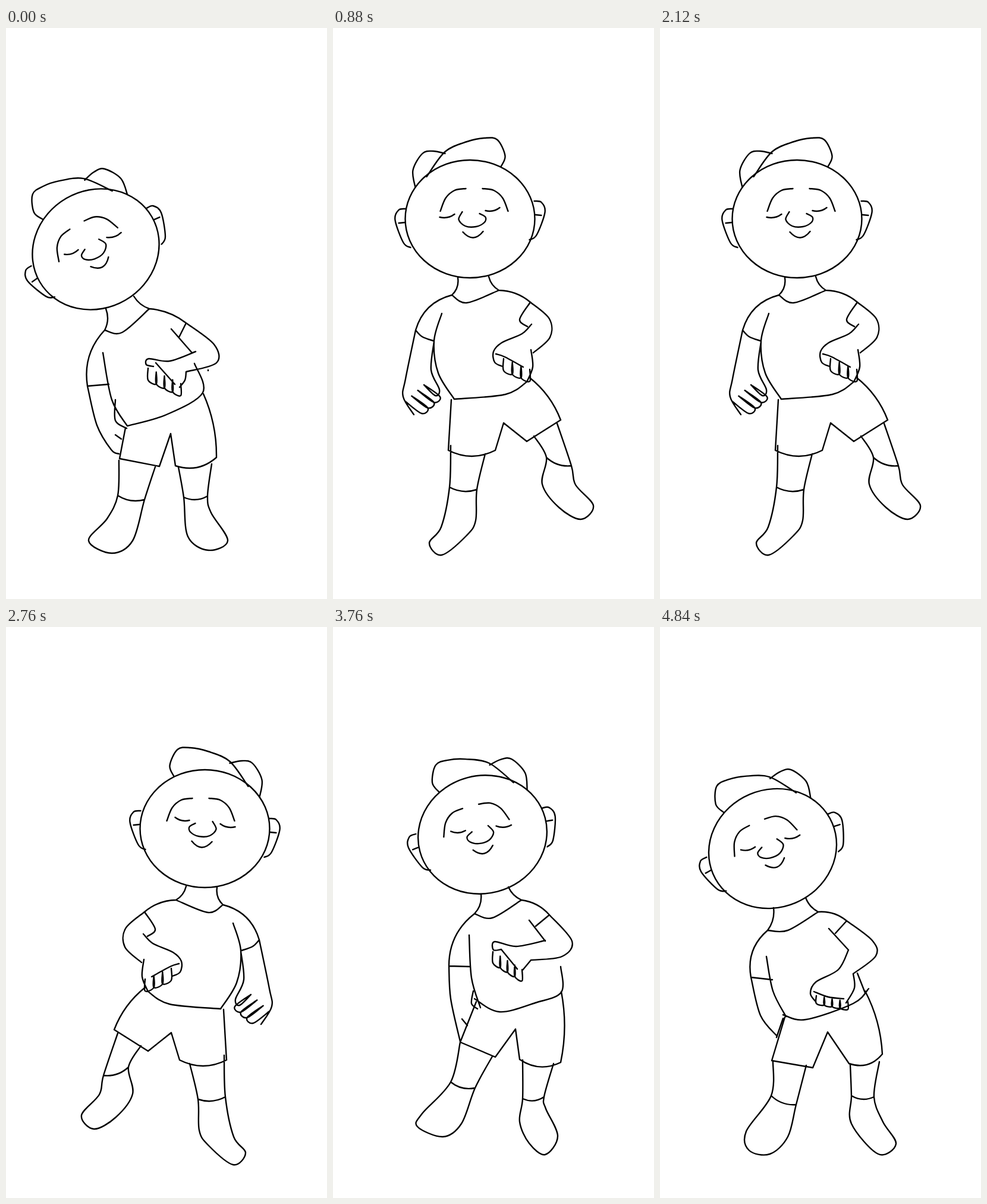
These frames come from a looping animation (540 by 960 pixels, 4920 ms). An HTML page:

```html
<!DOCTYPE html>
<html lang="en">
<head>
<meta charset="utf-8">
<title>Dancing boy</title>
<style>
  html, body { margin: 0; width: 100%; height: 100%; overflow: hidden; background: #fff; }
  svg { display: block; width: 100%; height: 100%; }
  svg * { fill: none; stroke: #000; stroke-width: 2.4; stroke-linecap: round; stroke-linejoin: round; }
</style>
</head>
<body>
<svg id="stage" viewBox="0 0 540 960"></svg>
<script>
const stage = document.getElementById("stage");

function add(parent, tag, attrs) {
  const el = document.createElementNS("http://www.w3.org/2000/svg", tag);
  for (const k in attrs) el.setAttribute(k, attrs[k]);
  return parent.appendChild(el);
}

const pts = text => text.split(" ").map(p => p.split(",").map(Number));
const plus = (a, b, s = 1) => [a[0] + b[0] * s, a[1] + b[1] * s];
const mix = (a, b, u) => [a[0] + (b[0] - a[0]) * u, a[1] + (b[1] - a[1]) * u];

// Smooth curve through points (Catmull-Rom)
function curve(p) {
  if (typeof p === "string") p = pts(p);
  const at = i => p[Math.max(0, Math.min(p.length - 1, i))];
  const slope = i => mix(at(i - 1), at(i + 1), 0.5).map((v, k) => (v - at(i - 1)[k]) / 3);
  let d = "M" + p[0];
  for (let i = 1; i < p.length; i++) {
    d += `C${plus(p[i - 1], slope(i - 1))} ${plus(p[i], slope(i), -1)} ${p[i]}`;
  }
  return d;
}

// Bow from a to b; a positive sag bends it to the right-hand side of the way
function arc(a, b, sag = 0) {
  const dx = b[0] - a[0], dy = b[1] - a[1], s = 2 * sag / Math.hypot(dx, dy);
  return `M${a}Q${plus(mix(a, b, 0.5), [-dy, dx], s)} ${b}`;
}

// n U-shaped fingers on the knuckle line a-b
function fingers([a, b, reach], n) {
  let d = "";
  for (let i = 0; i < n; i++) {
    const p = mix(a, b, i / n), q = mix(a, b, (i + 1) / n);
    d += curve([p, plus(p, reach), plus(q, reach), q]);
  }
  return d;
}

// Outline from hip round the foot and back; the hem joins the second and last but one points
function leg(text) {
  const p = pts(text);
  return curve(p) + arc(p[1], p[p.length - 2], 5);
}

// One head for all poses, around its own centre
function head(parent, [x, y, tilt, side = 1]) {
  const g = add(parent, "g", { transform: `translate(${x} ${y}) rotate(${tilt}) scale(${side} 1)` });
  add(g, "ellipse", { rx: 109, ry: 99 });
  let d = curve("73,-71 42,-113 5,-130 -24,-136 -46,-133 -59,-106 -52,-88") +
    curve("92,-53 96,-82 80,-110 62,-114 42,-110") +
    curve("13,-12 19,1 8,12 -10,13 -24,6 -26,-3 -16,-9") +
    arc([-22, 21], [12, 22], 10) + arc([26, -8], [51, -3], 3) + arc([-50, -19], [-26, -14], 3);
  for (const s of [1, -1]) {
    const ear = p => curve(pts(p).map(([px, py]) => [s * px, py + (s - 1) * 6.5]));
    const brow = pts("14,-51 33,-48 48,-35 57,-13").map(([px, py]) => [s * px - 7, py]);
    d += ear("108,-17 120,-15 126,2 112,40 100,48") + ear("110,6 120,7") + curve(brow);
  }
  add(g, "path", { d });
}

function body(p) {
  const [jawL, collarL, , collarR, jawR] = pts(p.neck);
  const [waistL, outL, inL, crotch, inR, outR, waistR] = pts(p.shorts);
  const [sagL, sagR] = p.cuffs || [0, 10];
  return [
    arc(jawL, collarL, -4), curve(pts(p.neck).slice(1, 4)), arc(jawR, collarR, 3),
    arc(collarL, pts(p.hemL)[0], 12), arc(collarR, pts(p.hemR)[0], -5),
    ...[p.hemL, p.hemR, p.side, p.shirt, ...p.arms].map(curve),
    fingers(pts(p.fist), p.count || 4), p.open ? fingers(pts(p.open), 3) : "",
    arc(waistL, outL), arc(outL, inL, -sagL), arc(inL, crotch), arc(crotch, inR),
    arc(inR, outR, sagR), arc(waistR, outR, -6), leg(p.legA)
  ].join("");
}

// Key points of the four poses; the last point of fist and open is the finger length
const step = {
  head: [230.5, 321, 0, -1],
  neck: "210,420 200,449 225,462 279,441 262,418",
  hemL: "139,508 150,519 169,526", hemR: "332,461 314,490 327,502",
  side: "183,480 170,526 177,580 204,624", shirt: "204,624 290,616 326,595",
  arms: ["332,461 364,489 365,520 337,546", "334,498 318,514 284,529 270,544 272,562 285,569",
    "274,548 289,553 320,570", "333,541 336,570 326,595",
    "139,508 122,590 118,620 136,650", "170,527 165,575 179,608 172,618 153,600"],
  fist: "287,556 331,574 0,20", count: 3, open: "122,628 153,600 27,20",
  shorts: "199,625 194,710 273,710 287,664 326,695 383,659 331,588", cuffs: [-10, 0],
  legA: "198,702 196,772 182,839 162,866 183,886 225,853 240,828 242,776 256,716",
  legB: "338,686 359,722 352,767 380,806 417,826 438,803 408,768 401,736 377,665"
};
const glide = {
  head: [251.5, 349, -15],
  neck: "249,449 238,482 268,489 317,459 295,437",
  hemL: "195,570 231,571", hemR: "364,484 341,503",
  side: "229,518 233,590 248,640", shirt: "238,625 280,647 340,632 384,614 383,571",
  arms: ["364,484 402,528 385,554 333,560", "357,527 308,537 272,529 270,543 283,542",
    "283,542 310,575", "333,560 318,578", "330,493 357,528",
    "195,570 198,625 214,697", "236,612 233,633 243,642", "217,659 226,670"],
  fist: "269,546 318,576 0,19",
  shorts: "241,630 214,698 273,723 307,676 314,727 383,732 384,613",
  legA: "214,698 198,765 150,818 142,840 185,857 216,835 239,775 268,722",
  legB: "319,728 319,793 314,832 330,868 357,887 378,856 358,810 355,790 371,734"
};
const lean = {
  head: [189.5, 372.5, -23],
  neck: "191,472 181,510 215,510 266,479 245,455",
  hemL: "153,589 189,593", hemR: "314,494 295,515",
  side: "179,554 190,612 212,655", shirt: "207,652 245,660 325,633 351,608",
  arms: ["314,494 357,527 363,553 325,583", "317,543 300,576 262,597 253,616 262,630",
    "259,613 283,622 309,625", "325,583 327,607 313,632", "284,507 317,543", "332,582 345,615",
    "153,589 169,653 197,688", "196,690 207,658"],
  fist: "263,620 316,630 0,13",
  shorts: "210,656 188,729 257,741 282,681 318,734 374,718 345,612",
  legA: "190,730 187,788 145,848 150,880 185,886 215,857 229,803 246,737",
  legB: "320,735 322,788 322,835 367,886 397,869 375,832 360,790 369,731"
};
const dip = {
  head: [151, 372, -30],
  neck: "168,472 166,508 195,512 241,472 215,451",
  hemL: "137,602 173,599", hemR: "303,496 291,520",
  side: "163,546 178,625 204,669", shirt: "204,669 270,650 331,613 317,564",
  arms: ["303,496 350,532 354,563 303,578", "319,544 275,560 240,556 236,566 248,569",
    "252,563 284,599", "303,578 301,592 292,604", "278,506 312,545", "340,575 340,576",
    "137,602 153,668 177,709 190,716", "184,625 184,660 203,673", "184,684 194,691"],
  fist: "239,572 294,598 0,20",
  shorts: "201,672 191,724 258,737 277,682 285,736 354,722 332,615",
  legA: "190,727 188,786 170,825 139,862 178,883 213,862 233,793 251,738",
  legB: "290,738 299,789 306,855 340,878 373,862 345,815 339,787 346,733"
};

// flip: [mirror width, dy]; sway: skew from the floor up; kick: turn of the free leg; dy: drop
function draw(pose, { flip, sway = 0, kick = 0, dy = 0 } = {}) {
  const mirror = flip ? `matrix(-1 0 0 1 ${flip}) ` : "";
  const g = add(stage, "g", {
    transform: `${mirror}matrix(1 0 ${sway} 1 ${-880 * sway} ${dy})`,
    visibility: "hidden"
  });
  head(g, pose.head);
  add(g, "path", { d: body(pose) });
  add(g, "path", { d: leg(pose.legB), transform: `rotate(${kick} 335 640)` });
  return g;
}

const settle = { kick: 5.5, dy: 2 };
const arrive = { sway: -0.05, kick: 8 };
const over = [565, 18];

// One sway to the right and back: [hold in ms, drawing]
const cycle = [
  [40, draw(dip)],
  [80, draw(glide)],
  [80, draw(glide, { sway: -0.053 })],
  [80, draw(step, { ...arrive, flip: over })],
  [120, draw(step, { flip: over })],
  [80, draw(step, { ...settle, flip: over })],
  [80, draw(lean, { flip: [544, 6] })],
  [80, draw(lean, { flip: [544, 4], sway: 0.011 })],
  [80, draw(glide, { flip: [554, -6] })],
  [80, draw(glide, { flip: [560, -12], sway: -0.053 })],
  [80, draw(step, arrive)],
  [120, draw(step)],
  [120, draw(step, settle)],
  [80, draw(lean)],
  [40, draw(lean, { sway: 0.011 })]
];
const beat = cycle.reduce((sum, [ms]) => sum + ms, 0);
const loop = 4 * beat - 40;

let shown;
function show(t) {
  let left = (t % loop) % beat, i = 0;
  while (left >= cycle[i][0]) left -= cycle[i++][0];
  const next = cycle[i][1];
  if (next === shown) return;
  if (shown) shown.setAttribute("visibility", "hidden");
  next.setAttribute("visibility", "visible");
  shown = next;
}

const start = performance.now();
function tick() {
  show(Math.max(0, performance.now() - start));
  requestAnimationFrame(tick);
}
tick();
</script>
</body>
</html>
```
